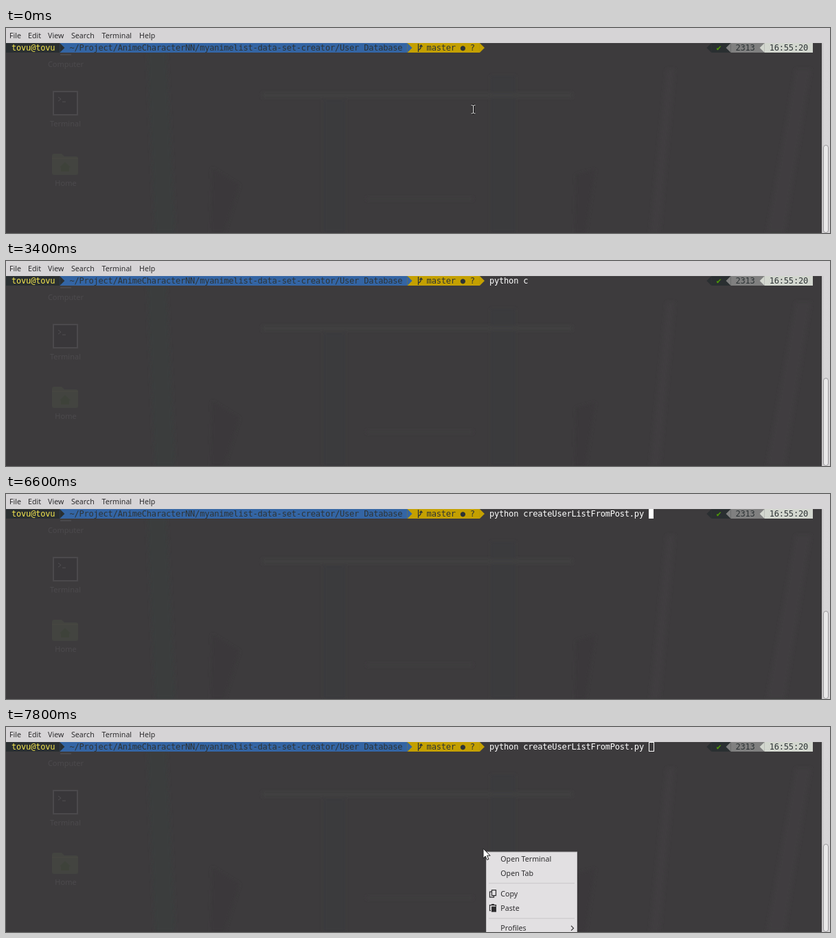
An HTML page that plays this animation: 1200x300 px, repeating every 8000 ms.

```html
<!DOCTYPE html>
<html lang="en">
<head>
<meta charset="utf-8">
<title>Terminal session</title>
<style>
html, body { margin: 0; width: 100%; height: 100%; overflow: hidden; background: #3d3b3d; }
svg { display: block; width: 100vw; height: 100vh; }
text { white-space: pre; }
.mono { font: 12.05px "DejaVu Sans Mono", monospace; letter-spacing: -0.224px; }
.ui { font: 10.667px "Noto Sans", "Open Sans", sans-serif; fill: #2d2c2e; }
.label { font: 11px "Noto Sans", "Open Sans", sans-serif; fill: #4c4a4d; text-anchor: middle; }
</style>
</head>
<body>
<svg id="stage" viewBox="0 0 1200 300" preserveAspectRatio="none">
  <defs>
    <filter id="soft" x="-20%" y="-20%" width="140%" height="140%"><feGaussianBlur stdDeviation="2.5"/></filter>
    <linearGradient id="trough"><stop offset="0" stop-color="#c4c2c4"/><stop offset=".3" stop-color="#d8d6d8"/><stop offset="1" stop-color="#d6d4d6"/></linearGradient>
  </defs>
  <rect width="1200" height="300" fill="#3d3b3d"/>
  <g id="wallpaper" filter="url(#soft)">
    <path d="M205 22h28l14 278h-30z" fill="#3b3c3e"/>
    <path d="M462 105h32v195h-32zM706 70h36v230h-36z" fill="#3b3a3c"/>
    <path d="M373 95h452v7h-452z" fill="#413f41"/>
    <path d="M525 248h155v4h-155z" fill="#3f3d3f"/>
    <path d="M300 205l40 25-22 70h-20zM830 215l28-8-14 93h-16z" fill="#3b393b"/>
    <path d="M962 60h12l-22 240h-14zM1150 60h22l-38 240h-26z" fill="#403e40"/>
  </g>
  <g id="desktop">
    <path d="M79 38h16v2h-16z" fill="#4a484a"/>
    <path d="M69 93h35v34h-35z" fill="#39373a" stroke="#4b494c" stroke-width="2"/>
    <path d="M76 101l4 3-4 3M82 108h5" fill="none" stroke="#504e51"/>
    <path d="M67 187q0-3 3-3h11l4 4h17q3 0 3 3v21q0 3-3 3h-32q-3 0-3-3z" fill="#434440"/>
    <path d="M67 191h38" stroke="#484943"/>
    <path d="M78 204l8-8 8 8h-2v6h-12v-6z" fill="#3e423a"/>
    <text class="label" x="87" y="57">Computer</text>
    <text class="label" x="86.5" y="144">Terminal</text>
    <text class="label" x="87" y="231">Home</text>
  </g>
  <rect width="1200" height="22" fill="#d6d4d6"/>
  <g id="menubar"></g>
  <rect x="1188" y="22" width="12" height="278" fill="url(#trough)"/>
  <rect x="1190.5" y="171.5" width="7" height="128" rx="3.5" fill="#e9e8e9" stroke="#99979a"/>
  <g id="prompt"></g>
  <text id="command" class="mono" y="33" fill="#fff"></text>
  <rect id="caret" y="22"/>
  <g id="popup"></g>
  <path id="beam" d="M-3-6h2l1 1 1-1h2M0-5V5M-3 6h2l1-1 1 1h2" fill="none"/>
  <path id="arrow" d="M0 0v14l3.2-3 2.4 5.4 2.4-1-2.4-5.2h4.6z" fill="#fff" stroke="#222" stroke-width="1"/>
</svg>
<script>
const LOOP = 8000, STEP = 200, CELL = 7.03;
const INK = "#2e3436", BLACK = "#2a2f31", BLUE = "#3465a4", GOLD = "#c4a000", GREY = "#808080", PALE = "#d3d7cf";
const COMMAND = "python createUserListFromPost.py ", COMMAND_COL = 100;

const byId = id => document.getElementById(id);
const col = n => 1 + n * CELL;

function add(parent, tag, attrs, content) {
  const el = document.createElementNS("http://www.w3.org/2000/svg", tag);
  for (const key in attrs) el.setAttribute(key, attrs[key]);
  if (content) el.textContent = content;
  parent.appendChild(el);
  return el;
}

function set(el, attrs) {
  for (const key in attrs) el.setAttribute(key, attrs[key]);
}

const show = (el, on) => el.setAttribute("visibility", on ? "visible" : "hidden");

// Menu bar
[["File", 5], ["Edit", 32], ["View", 61], ["Search", 95], ["Terminal", 139.5], ["Help", 194]]
  .forEach(([name, x]) => add(byId("menubar"), "text", { class: "ui", x, y: 15 }, name));

// Prompt segments, placed on the character grid
const prompt = byId("prompt");
const band = (from, to, fill) =>
  add(prompt, "rect", { x: col(from), y: 22, width: (to - from) * CELL, height: 14, fill });
const tipRight = (n, fill) =>
  add(prompt, "path", { d: `M${col(n)} 22l${CELL} 7l${-CELL} 7z`, fill });
const tipLeft = (n, fill) =>
  add(prompt, "path", { d: `M${col(n + 1)} 22l${-CELL} 7l${CELL} 7z`, fill });
const word = (n, text, fill) =>
  add(prompt, "text", { class: "mono", x: col(n), y: 33, fill }, text);

add(prompt, "rect", { x: 0, y: 22, width: col(11), height: 14, fill: BLACK });
band(11, 83, BLUE);
band(83, 98, GOLD);
tipRight(11, BLACK);
tipRight(83, BLUE);
tipRight(98, GOLD);
word(1, "tovu@tovu", "#f4e64f");
word(13, "~/Project/AnimeCharacterNN/myanimelist-data-set-creator/User Database", INK);
add(prompt, "path", { d: "M600.5 23v12M600.5 32q4-1 4-6M602.5 27.5l2-2.5 2 2.5", fill: "none", stroke: INK, "stroke-width": 1.3 });
word(87, "master ● ?", INK);

tipLeft(145, BLACK);
band(146, 150, BLACK);
tipLeft(149, GREY);
band(150, 157, GREY);
tipLeft(156, PALE);
band(157, 167, PALE);
word(147, "✔", "#4e9a06");
word(151, "2313", INK);
word(158, "16:55:20", INK);

// Context menu; `stretch` scales the row spacing
function buildMenu(x, y, stretch, copyOn) {
  const g = add(byId("popup"), "g", { transform: `translate(${x} ${y})` });
  const at = v => v * stretch;
  const line = (d, stroke = "#2d2c2e") => add(g, "path", { d, fill: "none", stroke, "stroke-width": 1.2 });
  add(g, "rect", { x: .5, y: .5, width: 132, height: at(176), fill: "#e2e0e2", stroke: "#c2c0c2" });
  [45, 95, 123, 151.5].forEach(v => line(`M4 ${at(v)}h125`, "#cdcbcd"));
  const rows = { "Open Terminal": 10, "Open Tab": 31, "Copy": 59.5, "Paste": 80.5, "Profiles": 109, "Read-Only": 137.5, "Show Menubar": 166 };
  const dim = "#929093";
  for (const name in rows) {
    const item = add(g, "text", { class: "ui", x: 21.3, y: at(rows[name]) + 4 }, name);
    if (name === "Copy" && !copyOn) item.style.fill = dim;
  }
  const copy = at(59.5), paste = at(80.5), more = at(109), tick = at(166);
  line(`M8.5 ${copy - 5}h6v8h-6zM8 ${copy - 2.5}h-2.5v8h6v-2`, copyOn ? "#2d2c2e" : dim);
  line(`M7 ${paste + 3.5}h-1.5v-8h9v2M8 ${paste - 5.5}h4`);
  add(g, "rect", { x: 8, y: paste - 2.5, width: 7, height: 8, fill: "#2d2c2e" });
  line(`M124 ${more - 3.5}l3.5 3.5-3.5 3.5`);
  line(`M8 ${tick + .5}l2.5 3 6-7`);
  return g;
}
const fadingMenu = buildMenu(683, 121, 1, false);
const fullMenu = buildMenu(699, 182.5, 1.027, true);
fadingMenu.setAttribute("opacity", .69);

const beam = byId("beam"), halo = beam.cloneNode();
halo.removeAttribute("id");
beam.before(halo);
set(halo, { stroke: "#1c1b1c", "stroke-width": 3 });
set(beam, { stroke: "#f2f2f2", "stroke-width": 1 });

// Moments of each key press; the last one completes the file name
const keys = [[1000, 1], [1200, 2], [1600, 3], [1800, 4], [2000, 5], [2400, 7], [2800, 8], [4000, 33]];

const typedAt = t => keys.reduce((n, [time, count]) => t >= time ? count : n, 0);

function caretOn(t) {
  if (t < 1000) return t >= 200 && t < 800;
  if (t < 3400) return true;
  if (t < 3800) return false;
  if (t < 6800) return Math.floor((t - 3800) / 600) % 2 === 0;
  return true;
}

function render(time) {
  const t = Math.floor((time % LOOP) / STEP) * STEP;
  const typed = typedAt(t);
  const fading = t === 6800, open = t >= 7600;

  const command = byId("command"), caret = byId("caret");
  command.setAttribute("x", col(COMMAND_COL));
  command.textContent = COMMAND.slice(0, typed);

  const x = col(COMMAND_COL + typed), hollow = fading || open;
  show(caret, caretOn(t));
  set(caret, hollow
    ? { x: Math.round(x) + .5, y: 22.5, width: 7, height: 13, fill: "none", stroke: "#fff" }
    : { x, y: 22, width: CELL, height: 14, fill: "#fff", stroke: "none" });

  show(fadingMenu, fading);
  show(fullMenu, open);

  // Pointer hides while typing, then glides down to the second menu
  const glide = Math.min(1, Math.max(0, (t - 7000) / 400));
  const place = `translate(${680.5 + 14 * glide} ${119 + 60 * glide})`;
  for (const el of [halo, beam]) {
    el.setAttribute("transform", place);
    show(el, t < 1000 || (t >= 6800 && !open));
  }
  byId("arrow").setAttribute("transform", "translate(695 178)");
  show(byId("arrow"), open);
}

const start = performance.now();
function tick() {
  render(performance.now() - start);
  requestAnimationFrame(tick);
}
tick();
</script>
</body>
</html>
```
